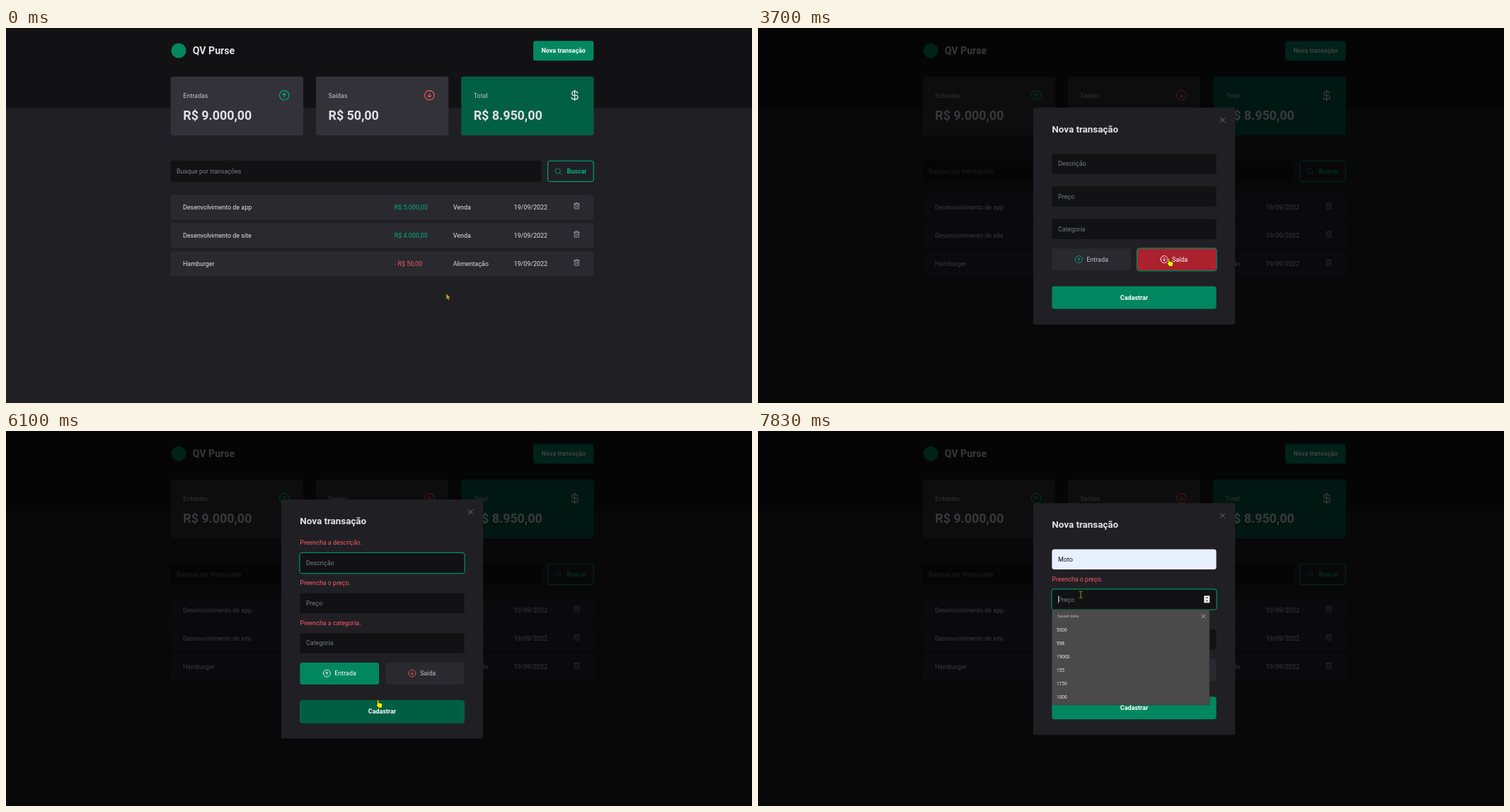
Animation of 1054x531 px, one loop 8 s. Source, as an HTML page:

```html
<!DOCTYPE html>
<html lang="pt-BR">
<head>
<meta charset="utf-8">
<title>Transações</title>
<style>
html, body { margin: 0; width: 100%; height: 100%; overflow: hidden; background: #202024; }
svg { display: block; width: 100%; height: 100%; }
text { font-family: Roboto, sans-serif; white-space: pre; }
.menu text { font-family: "Open Sans", "Noto Sans", sans-serif; }
</style>
</head>
<body>
<svg viewBox="0 0 1054 531">
  <g id="page"></g>
  <g id="live"></g>
</svg>
<script>
const LOOP = 8000;
const SIZE = 8.92;
const C = {
  bg: '#202024', dark: '#121214', card: '#323238', row: '#29292e',
  green: '#00875f', deep: '#015f43', bright: '#00b37e', focus: '#008f64',
  red: '#f75a68', crimson: '#ab222e', text: '#e1e1e6', soft: '#c4c4cc', mute: '#7c7c8a'
};

// Icon paths on a 256 unit grid
const RING = 'M32 128a96 96 0 1 0 192 0a96 96 0 1 0-192 0';
const ICON = {
  up: RING + 'M94 122L128 88L162 122M128 168V88',
  down: RING + 'M94 134L128 168L162 134M128 88V168',
  dollar: 'M128 24V232M184 88a40 40 0 0 0-40-40H112a40 40 0 0 0 0 80h40a40 40 0 0 1 0 80H104a40 40 0 0 1-40-40',
  search: 'M32 116a84 84 0 1 0 168 0a84 84 0 1 0-168 0M175.4 175.4L224 224',
  trash: 'M216 56H40M104 104V168M152 104V168M200 56V208a8 8 0 0 1-8 8H64a8 8 0 0 1-8-8V56M168 56V40a16 16 0 0 0-16-16H104a16 16 0 0 0-16 16V56',
  close: 'M200 56L56 200M200 200L56 56'
};

const rect = (x, y, w, h, fill, extra = 'rx="3.3"') =>
  `<rect x="${x}" y="${y}" width="${w}" height="${h}" fill="${fill}" ${extra}/>`;

// Text is placed by the middle of its line
const text = (str, x, cy, fill, size = SIZE, weight = 400, anchor = 'start') =>
  `<text x="${x}" y="${cy + size * .342}" fill="${fill}" font-size="${size}" font-weight="${weight}" text-anchor="${anchor}">${str}</text>`;

const icon = (name, cx, cy, size, color) =>
  `<path d="${ICON[name]}" transform="translate(${cx - size / 2} ${cy - size / 2}) scale(${size / 256})"
    fill="none" stroke="${color}" stroke-width="16" stroke-linecap="round" stroke-linejoin="round"/>`;

const outline = (x, y, w, h) =>
  rect(x - .5, y - .5, w + 1, h + 1, 'none', `rx="3.8" stroke="${C.focus}" stroke-width="1.2"`);

const button = (label, x, y, w, h, hover, focused) =>
  rect(x, y, w, h, C.green) + rect(x, y, w, h, C.deep, `rx="3.3" opacity="${hover}"`) +
  (focused ? outline(x, y, w, h) : '') +
  text(label, x + w / 2, y + h / 2, '#fff', SIZE, 700, 'middle');

function page() {
  const cards = [
    ['Entradas', 'R$ 9.000,00', C.card, 'up', C.bright],
    ['Saídas', 'R$ 50,00', C.card, 'down', C.red],
    ['Total', 'R$ 8.950,00', C.deep, 'dollar', '#fff']
  ].map(([label, value, fill, name, color], i) => {
    const x = 232.7 + 205.2 * i;
    return rect(x, 68.7, 187.3, 83.3, fill) + text(label, x + 17.6, 95.5, C.soft) +
      text(value, x + 17.6, 123.6, C.text, SIZE * 2, 700) + icon(name, x + 160.4, 95.3, 17.84, color);
  });
  const rows = [
    ['Desenvolvimento de app', 'R$ 5.000,00', 'Venda', C.bright],
    ['Desenvolvimento de site', 'R$ 4.000,00', 'Venda', C.bright],
    ['Hamburger', '- R$ 50,00', 'Alimentação', C.red]
  ].map(([what, price, kind, color], i) => {
    const y = 236 + 40.1 * i, cy = y + 17.7;
    return rect(232.7, y, 597.6, 35.4, C.row) + text(what, 250, cy, C.text) +
      text(price, 548.8, cy, color) + text(kind, 631.8, cy, C.text) +
      text('19/09/2022', 717.6, cy, C.text) + icon('trash', 806.3, y + 16.2, 11.15, C.soft);
  });
  return rect(0, 0, 1054, 531, C.bg, '') + rect(0, 0, 1054, 113, C.dark, '') +
    `<circle cx="244" cy="32" r="10.5" fill="${C.green}"/>` +
    text('QV Purse', 263.8, 32.3, C.text, 14.1, 700) + cards.join('') +
    rect(232.7, 187.8, 523.5, 30, C.dark) + text('Busque por transações', 241, 203, C.mute) +
    rect(765.5, 188.2, 64.6, 29.2, 'none', `rx="3" stroke="${C.bright}"`) +
    icon('search', 780.2, 203, 11.15, C.bright) +
    text('Buscar', 792.6, 203, C.bright, SIZE, 700) + rows.join('');
}

const ramp = (t, from, to) => Math.min(1, Math.max(0, (t - from) / (to - from)));
const within = (t, from, to) => t >= from && t < to;

// Times of the user's actions
const T = {
  open: 2010, pickOut: 3100, outOn: 3160, pickIn: 4390, inOn: 4550,
  press: 5360, invalid: 5480, menu: 6870, preview: 7150, fill: 7430,
  price: 7690, priceMenu: 7760
};

function focusAt(t) {
  const order = [['close', T.open], ['out', T.pickOut], ['in', T.pickIn],
    ['send', T.press], ['desc', T.invalid], ['price', T.price]];
  return order.filter(([, at]) => t >= at).pop()[0];
}

function menu(y, items, active) {
  const top = y + 28.6;
  return '<g class="menu">' +
    rect(415.3, top, 222.6, 135, '#4a4a4a', 'rx="1" stroke="#333" stroke-width=".5"') +
    (active ? rect(415.6, top + 19.2, 222, 19, '#606060', '') : '') +
    text('Saved data', 423, top + 9.4, '#c8c8c8', 5.9) +
    icon('close', 629.5, top + 9.4, 9, '#fff') +
    items.map((s, i) => text(s, 422, top + 28.6 + 19 * i, '#fff', 6.35)).join('') + '</g>';
}

function toggle(label, name, x, y, on, onFill, color, focused) {
  return rect(x, y, 111.7, 31, on ? onFill : C.row) + (focused ? outline(x, y, 111.7, 31) : '') +
    icon(name, x + 38, y + 15.3, 13.38, on ? '#fff' : color) +
    text(label, x + 49, y + 15.2, on ? '#fff' : C.soft);
}

function modal(t) {
  const GAP = 10.4, LEFT = 415.3, WIDTH = 232.2;
  const focus = focusAt(t);
  const errors = t < T.invalid ? [0, 0, 0] : t < T.fill ? [1, 1, 1] : [0, 1, 1];
  const height = 307.2 + GAP * errors.reduce((a, b) => a + b);
  const top = 266.3 - height / 2;
  const outgoing = within(t, T.outOn, T.inOn);
  const filled = t >= T.preview;

  let y = top + 65.3 - 46.3;
  const tops = errors.map(e => y += 46.3 + GAP * e);
  const labels = ['Descrição', 'Preço', 'Categoria'];
  const messages = ['Preencha a descrição.', 'Preencha o preço.', 'Preencha a categoria.'];
  const fields = tops.map((fy, i) => {
    const full = i === 0 && filled;
    const focused = focus === ['desc', 'price'][i];
    const caret = focused && !within(t, 6040, 6540) && !within(t, T.preview, T.price);
    return (errors[i] ? text(messages[i], LEFT, fy - 14.4, C.red) : '') +
      rect(LEFT, fy, WIDTH, 28.4, full ? '#e8f0fe' : C.dark) +
      (focused ? outline(LEFT, fy, WIDTH, 28.4) : '') +
      text(full ? 'Moto' : labels[i], 424, fy + 14.2, full ? C.dark : '#767b8c') +
      (caret ? rect(424.1, fy + 8.8, .8, 10.8, C.text, '') : '');
  });
  const spinner = t < 7530 ? '' : rect(630.2, tops[1] + 9, 8, 10, '#eee', 'rx=".5"') +
    `<path d="M632.4 ${tops[1] + 12.8}l1.8-2 1.8 2zm0 2.6l1.8 2 1.8-2z" fill="#333"/>`;

  const tY = tops[2] + 41.7;
  const sendHover = ramp(t, 5100, 5240) - ramp(t, 6100, 6260);
  const closeFocus = focus === 'close';
  const closeColor = closeFocus ? '#3d9478' : '#8d8d99';
  return rect(0, 0, 1054, 531, '#000', 'opacity=".75"') +
    rect(388.8, top, 285.4, height, C.bg) +
    (closeFocus ? rect(651, top + 12.3, 10.6, 10.6, 'none', `stroke="${closeColor}"`) : '') +
    icon('close', 656.3, top + 17.6, 11.15, closeColor) +
    text('Nova transação', LEFT, top + 30.5, C.text, SIZE * 1.5, 700) +
    fields.join('') + spinner +
    toggle('Entrada', 'up', LEFT, tY, !outgoing, C.green, C.bright, focus === 'in') +
    toggle('Saída', 'down', 535.9, tY, outgoing, C.crimson, t < T.pickOut ? '#d0914f' : C.red, focus === 'out') +
    button('Cadastrar', LEFT, tY + 53.5, WIDTH, 32, sendHover, focus === 'send') +
    (within(t, T.menu, T.fill) ? menu(tops[0],
      ['Moto', 'Teste', 'Desenvolvimento de app', 'AAAq', 'Iogurte de Banana', 'Venda de consultoria'], filled) : '') +
    (t >= T.priceMenu ? menu(tops[1], ['5000', '998', '19000', '155', '1150', '1000']) : '');
}

// time, x, y of the pointer's hot spot
const TRACK = [
  [0, 622, 376], [1060, 622, 376], [1430, 798, 72], [1550, 807, 29], [1650, 803.5, 40],
  [2270, 803.5, 40], [2620, 553, 317], [2800, 580, 326], [3700, 580, 326], [4400, 475, 328],
  [4980, 475, 328], [5230, 528, 391], [6040, 528, 391], [6480, 474, 191], [6640, 474, 195.7],
  [6880, 474, 195.7], [7250, 456, 231.7], [LOOP, 456, 231.7]
];
const KINDS = [
  [0, 'arrow'], [2560, 'hand'], [6300, 'arrow'], [6390, 'beam'], [7000, 'arrow'], [T.fill, 'beam']
];
const POINTER = {
  arrow: 'M0 0v8.4l1.9-1.7 1.5 3 1.5-.7-1.5-2.9h2.6z',
  hand: 'M-.6.6q.9-1.4 1.8 0v3.6l4.2 1q1.3.5 1.1 2l-.7 4.3h-4.6l-3.3-4q0-1.3 1.5-.7z',
  beam: 'M-2.4-4.5h4.8M0-4.5v9M-2.4 4.5h4.8'
};

function pointer(t) {
  const i = TRACK.findIndex(p => p[0] > t);
  const [t0, x0, y0] = TRACK[i - 1], [t1, x1, y1] = TRACK[i];
  const k = ramp(t, t0, t1), e = k * k * (3 - 2 * k);
  const kind = KINDS.filter(([at]) => t >= at).pop()[1];
  const paint = kind === 'beam'
    ? 'fill="none" stroke="#98a01c" stroke-width=".9"'
    : `fill="${t < 1060 ? '#d6a02a' : '#f0f000'}" stroke="#1a1a00" stroke-width=".5"`;
  return `<path d="${POINTER[kind]}" transform="translate(${x0 + (x1 - x0) * e} ${y0 + (y1 - y0) * e})" ${paint}/>`;
}

function scene(t) {
  const pressed = within(t, 1850, T.open);
  return button('Nova transação', 745, 18.3, 85.3, 27.9, pressed ? ramp(t, 1850, 1970) : 0, pressed) +
    (t >= T.open ? modal(t) : '') + pointer(t);
}

document.getElementById('page').innerHTML = page();
const live = document.getElementById('live');
const start = performance.now();
let shown = '';

function tick() {
  const next = scene((performance.now() - start) % LOOP);
  if (next !== shown) live.innerHTML = shown = next;
  requestAnimationFrame(tick);
}
tick();
</script>
</body>
</html>
```
